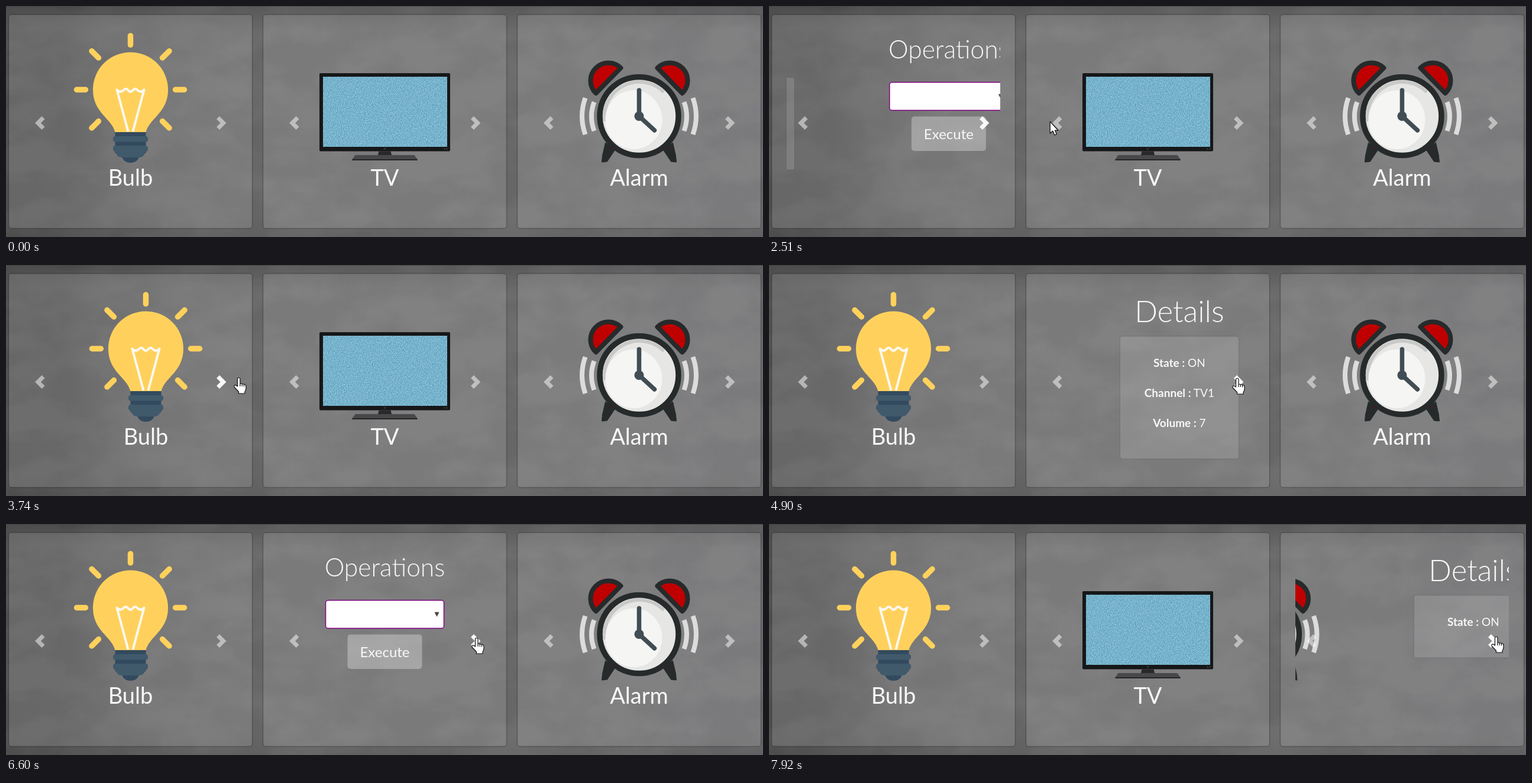
An HTML page that plays this animation: 1280x392 px, repeating every 7990 ms.

```html
<!DOCTYPE html>
<html lang="en">
<head>
<meta charset="utf-8">
<title>Device cards</title>
<style>
  html, body { margin: 0; width: 100%; height: 100%; overflow: hidden; background: #666; }
  svg { position: absolute; left: 0; top: 0; width: 1280px; height: 392px; }
  #wall { will-change: transform; }
  text { font-family: Lato, "Open Sans", sans-serif; fill: #f8f8f8; text-anchor: middle; }
  .name { font-size: 38px; }
  .details { font-size: 51px; font-weight: 300; }
  .operations { font-size: 42.5px; font-weight: 300; }
  .button { font-size: 24px; }
  .row { font-size: 19px; }
  .row tspan { font-weight: 700; }
  .chevron { fill: none; stroke: #fff; stroke-width: 7; opacity: .5; }
</style>
</head>
<body>
<svg id="wall" viewBox="0 0 1280 392">
  <defs>
    <linearGradient id="wallTone">
      <stop offset="0" stop-color="#525253"/><stop offset=".07" stop-color="#525253"/>
      <stop offset=".17" stop-color="#616162"/><stop offset=".3" stop-color="#686869"/>
      <stop offset=".75" stop-color="#6a6a6b"/><stop offset="1" stop-color="#69696b"/>
    </linearGradient>
    <linearGradient id="edgeTone" x2="0" y2="1">
      <stop offset="0" stop-opacity=".12"/><stop offset=".1" stop-opacity="0"/>
      <stop offset=".9" stop-opacity="0"/><stop offset="1" stop-opacity=".05"/>
    </linearGradient>
    <filter id="plaster" x="0" y="0" width="1" height="1" color-interpolation-filters="sRGB">
      <feTurbulence type="fractalNoise" baseFrequency=".011 .017" numOctaves="4" seed="8"/>
      <feColorMatrix values="3 0 0 0 -1  3 0 0 0 -1  3 0 0 0 -1  0 0 0 0 .03"/>
    </filter>
  </defs>
  <rect width="1280" height="392" fill="url(#wallTone)"/>
  <rect width="1280" height="392" fill="url(#edgeTone)"/>
  <rect width="1280" height="392" filter="url(#plaster)"/>
  <path d="M0 .5H1280" stroke="#454545"/>
  <g id="frames"></g>
</svg>

<svg id="scene" viewBox="0 0 1280 392">
  <defs>
    <clipPath id="view"><rect x="-180.5" width="361" height="392"/></clipPath>
    <filter id="static" x="0" y="0" width="1" height="1" color-interpolation-filters="sRGB">
      <feTurbulence type="fractalNoise" baseFrequency=".75" numOctaves="2" seed="3"/>
      <feColorMatrix values=".65 0 0 0 .14  .42 0 0 0 .49  .26 0 0 0 .67  0 0 0 0 1"/>
    </filter>
  </defs>
  <g id="cards"></g>
  <circle id="click" r="15" fill="#d6d61c" opacity=".75"/>
  <g id="cursor" fill="#fff" stroke="#111" stroke-width="1.2" stroke-linejoin="round">
    <path id="arrow" d="M0 0V20L4.6 16 7.7 23 11 21.5 8.2 15H13.5Z"/>
    <g id="hand">
      <path d="M-2.5 13V.5a2.2 2.2 0 0 1 4.5 0V8l7.5 1.5q2.5 .7 2.5 3.5v3q0 3-2 6v3H-.5v-3L-7.5 14.5q-1.5-2.5 .5-3.5 2-.7 4.5 2z"/>
      <path d="M2 8v5M5.3 9v4M8.5 9.5v4" fill="none"/>
    </g>
  </g>
</svg>

<script>
const LOOP = 7990, SLIDE = 560, WIDTH = 361;
const $ = id => document.getElementById(id);
const mirror = shape => shape + `<g transform="scale(-1 1)">${shape}</g>`;

const bulbRays = mirror('<path d="M-91 142h15M-65.5 76.5l11.5 11.5M-65.5 207l11.5-11.5"/>');
const bulb = `
  <g stroke="#ffd15c" stroke-width="9.5" stroke-linecap="round">
    <path d="M0 50.5V66"/>${bulbRays}
  </g>
  <path d="M-63.5 142a63.5 63.5 0 0 1 127 0c0 39-31 48-37.5 72h-52c-6.5-24-37.5-33-37.5-72z" fill="#ffd15c"/>
  <path d="M-4 213-23 142q5 6 11 1 4-5 8 0 4 5 8 0 4-5 8 0 6 5 11-1L4 213"
    fill="none" stroke="#fbf8f0" stroke-width="4" stroke-linejoin="round"/>
  <path d="M-26 214H26V250H16Q14 266 0 266T-16 250H-26Z" fill="#334a5e"/>
  <g fill="#40596b">
    <rect x="-29.5" y="221" width="59" height="9.5" rx="4"/>
    <rect x="-29.5" y="237" width="59" height="10" rx="4"/>
    <path d="M-25 246H25Q24 257 14 257H-14Q-24 257-25 246Z"/>
  </g>`;

const tv = `
  <rect x="-110.5" y="114" width="221" height="132.5" rx="2" fill="#161718"/>
  <rect x="-104" y="120" width="209" height="119" filter="url(#static)"/>
  <circle cy="242.5" r="2" fill="#303032"/>
  <path d="M100 242.5h2m2 0h2" stroke="#4a4040" stroke-width="2"/>
  <path d="M-10 246.5H10L12 255H-12Z" fill="#29292b"/>
  <path d="M-50 253H50L55 260V262H-55V260Z" fill="#48484b"/>
  <path d="M-55 261H55" stroke="#252527" stroke-width="2"/>`;

const alarm = `
  ${mirror(`
    <path d="M-73 148A30 30 0 0 1-31 105Z" fill="#c00000"
      stroke="#262a2b" stroke-width="8" stroke-linejoin="round"/>
    <path d="M-57 232-40 243-54 264-63 265-62 254Z" fill="#262a2b" stroke="#262a2b" stroke-linejoin="round"/>
    <path d="M-48 240l3 2" stroke="#700" stroke-width="2"/>
    <path d="M-91 156Q-102 187-91 218M-76 163Q-85 187-76 212" fill="none" stroke="#dcdcdc" stroke-width="8"/>`)}
  <circle cy="187" r="66.5" fill="#e6e6e5" stroke="#262a2b" stroke-width="9.5"/>
  <path d="M-58 196A59 59 0 0 1 42 146" fill="none" stroke="#c9c9c8" stroke-width="6"/>
  <ellipse cx="-9" cy="193" rx="48" ry="50" fill="#f5f5f3"/>
  <path d="M0 143V187L26 211" fill="none" stroke="#414d54" stroke-width="7.5" stroke-linecap="round" stroke-linejoin="round"/>
  <circle cy="187" r="8" fill="#414d54"/>`;

const details = rows => `
  <text class="details" y="97">Details</text>
  <rect x="-100.5" y="121" width="201" height="${55 + 51 * rows.length}" rx="4"
    fill="#fff" fill-opacity=".13" stroke="#000" stroke-opacity=".14"/>
  ${rows.map(([key, value], i) =>
    `<text class="row" y="${173 + 51 * i}"><tspan>${key} :</tspan> ${value}</text>`).join('')}`;

const operations = `
  <text class="operations" y="89">Operations</text>
  <rect x="-100" y="129.5" width="200" height="47.5" rx="4" fill="#fff" stroke="#800080" stroke-width="1.5"/>
  <path d="M84 149.5h8l-4 8z" fill="#444"/>
  <rect x="-63" y="187.5" width="126" height="58.5" rx="5" fill="#fff" fill-opacity=".3"/>
  <text class="button" y="226">Execute</text>`;

// Slides are start times with an optional duration; lit is when the right chevron is bright.
const cards = [
  { name: 'Bulb', icon: bulb, rows: [['State', 'ON'], ['Intensity', '10']],
    slides: [[1590], [2262], [3364]], lit: [1000, 4290] },
  { name: 'TV', icon: tv, rows: [['State', 'ON'], ['Channel', 'TV1'], ['Volume', '7']],
    slides: [[4590], [5160], [6776]], lit: [4160, 7620] },
  { name: 'Alarm', icon: alarm, rows: [['State', 'ON']],
    slides: [[7746, 450]], lit: [7490, LOOP] }
];

const clicks = [[1220, 1290], [1930, 2010], [3130, 3280], [4280, 4360],
  [4820, 4890], [5590, 5720], [6510, 6600], [7610, 7680]];

// time, x, y
const cursorPath = [
  [70, 474, 314], [130, 397, 279], [330, 397, 279], [640, 260, 238], [840, 305, 186], [1140, 357, 194],
  [2270, 357, 194], [2510, 474, 196], [2720, 744, 202], [2790, 744, 202], [3050, 348, 191],
  [3400, 348, 191], [3740, 393, 193], [4210, 792, 194],
  [5960, 792, 194], [6240, 845, 198], [6500, 796, 195],
  [6720, 796, 195], [7230, 1269, 210], [7300, 1269, 211], [7530, 1230, 193]
];

$('frames').innerHTML = cards.map((_, i) => `
  <rect x="${4.5 + 430 * i}" y="14.5" width="412" height="363" rx="5" fill="none" stroke="#000" stroke-opacity=".17" stroke-width="2"/>
  <rect x="${5 + 430 * i}" y="15" width="411" height="362" rx="4" fill="#fff" fill-opacity=".135"/>`).join('');

$('cards').innerHTML = cards.map(({ name, icon, rows }, i) => {
  const panes = [`${icon}<text class="name" y="305">${name}</text>`, details(rows), operations];
  return `<g class="card" transform="translate(${210.5 + 430 * i})">
    <g clip-path="url(#view)">${panes.map(p => `<g class="pane">${p}</g>`).join('')}</g>
    <path class="chevron" d="M-147.5 189.5l-9 9 9 9"/>
    <path class="chevron next" d="M148 189.5l9 9-9 9"/>
  </g>`;
}).join('');

document.querySelectorAll('.card').forEach((card, i) => {
  cards[i].panes = card.querySelectorAll('.pane');
  cards[i].next = card.querySelector('.next');
});

const within = (t, [from, to]) => t >= from && t < to;

// cubic-bezier(.25, .1, .25, 1)
function ease(x) {
  if (x <= 0) return 0;
  if (x >= 1) return 1;
  const bezier = (u, a, b) => 3 * a * u * (1 - u) ** 2 + 3 * b * u * u * (1 - u) + u ** 3;
  let low = 0, high = 1;
  for (let i = 0; i < 20; i++) {
    const mid = (low + high) / 2;
    if (bezier(mid, .25, .25) < x) low = mid; else high = mid;
  }
  return bezier(low, .1, 1);
}

function cursorAt(t) {
  const i = cursorPath.findIndex(p => p[0] > t);
  if (i < 0) return cursorPath.at(-1).slice(1);
  const a = cursorPath[Math.max(0, i - 1)], b = cursorPath[i];
  const f = a === b ? 0 : (t - a[0]) / (b[0] - a[0]);
  return [a[1] + (b[1] - a[1]) * f, a[2] + (b[2] - a[2]) * f];
}

function show(element, visible) {
  element.setAttribute('visibility', visible ? 'visible' : 'hidden');
}

function draw(t) {
  for (const { panes, next, slides, lit } of cards) {
    const position = slides.reduce((sum, [start, length = SLIDE]) => sum + ease((t - start) / length), 0);
    panes.forEach((pane, i) => {
      const place = (i - position + 4) % 3 - 1;
      pane.setAttribute('transform', `translate(${place * WIDTH})`);
      pane.style.display = Math.abs(place) < 1 ? '' : 'none';
    });
    next.style.opacity = within(t, lit) ? .95 : .5;
  }
  const [x, y] = cursorAt(t);
  const overChevron = y < 225 && [0, 430, 860].some(left => within(x - left, [335, 396]));
  const present = t >= 70;
  $('cursor').setAttribute('transform', `translate(${x} ${y})`);
  show($('arrow'), present && !overChevron);
  show($('hand'), present && overChevron);
  $('click').setAttribute('transform', `translate(${x} ${y})`);
  show($('click'), clicks.some(span => within(t, span)));
}

const begin = performance.now();
function tick() {
  draw((performance.now() - begin) % LOOP);
  requestAnimationFrame(tick);
}
tick();
</script>
</body>
</html>
```
